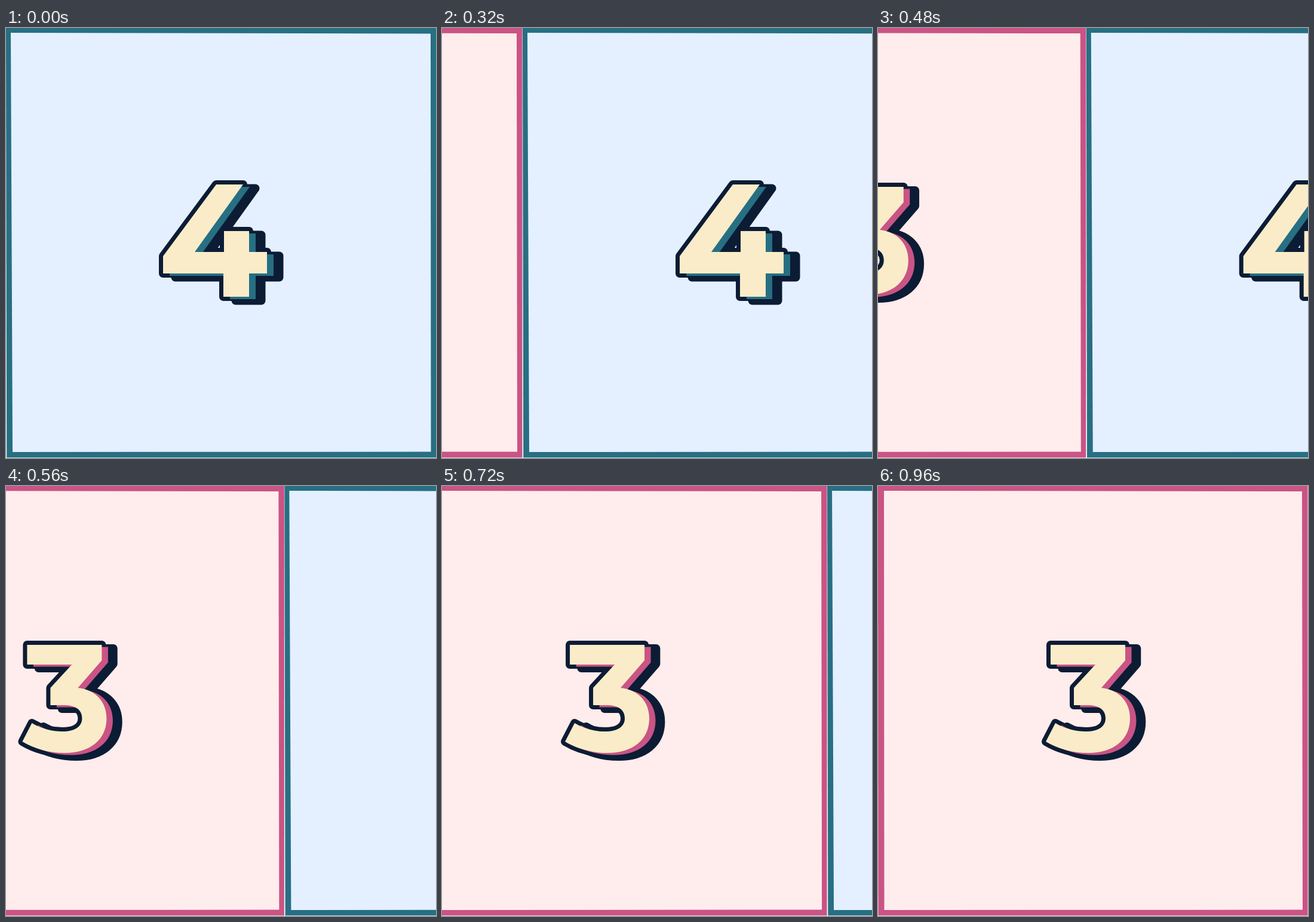
Write an HTML page that moves like this. It is 720x720 px and loops after 1.04 s.

```html
<!DOCTYPE html>
<html lang="en">
<head>
<meta charset="utf-8">
<title>Sliding numbers</title>
<style>
  html, body { margin: 0; width: 100%; height: 100%; overflow: hidden; background: #fff; }
  svg { display: block; width: 100vw; height: 100vh; }
  .ink { fill: #0c1c35; stroke: #0c1c35; stroke-width: 14; stroke-linejoin: round; }
  .face { fill: #faecc8; }
</style>
</head>
<body>
<svg viewBox="0 0 720 720">
  <defs>
    <path id="four" d="M352 262H397L316 375H365V340H407V375H437V411H407V450H364V411H263V382Z"/>
    <path id="three" d="M289 266H414V292L374 338C404 341 422 362 422 389C422 425 394 447 352 447
      C326 447 301 440 281 428L297 397C314 407 332 411 348 411C369 411 381 403 381 389
      C381 375 371 367 350 367H328V338L364 299H289Z"/>
  </defs>

  <g id="pink">
    <path fill="#c95485" d="M0 0H719.5V719.2H0.5Z"/>
    <path fill="#ffecec" d="M10 8L710 9L711 709.5L10.5 710Z"/>
    <use href="#three" class="ink"/>
    <use href="#three" class="ink" x="19.3" y="6"/>
    <use href="#three" fill="#c95485" x="10.5" y="3.5"/>
    <use href="#three" class="face"/>
  </g>

  <g id="blue">
    <path fill="#276f83" d="M0 0H720V719.2H1.2Z"/>
    <path fill="#e4f0ff" d="M8 8L711 9.5L711.5 709.5L11 710Z"/>
    <use href="#four" class="ink"/>
    <use href="#four" class="ink" x="20.5" y="6.5"/>
    <use href="#four" fill="#276f83" x="11" y="4"/>
    <use href="#four" class="face"/>
  </g>
</svg>
<script>
  const LOOP = 1040, STEP = 40, START = 51, LENGTH = 873, SIZE = 720, HANDLE = 0.45;
  const pink = document.getElementById('pink');
  const blue = document.getElementById('blue');

  // Symmetric cubic-bezier(HANDLE, 0, 1 - HANDLE, 1), solved by bisection.
  function ease(x) {
    if (x <= 0) return 0;
    if (x >= 1) return 1;
    let low = 0, high = 1, s = 0.5;
    for (let i = 0; i < 30; i++) {
      s = (low + high) / 2;
      const r = 1 - s;
      const px = 3 * HANDLE * s * r * r + 3 * (1 - HANDLE) * s * s * r + s ** 3;
      if (px < x) low = s; else high = s;
    }
    return s * s * (3 - 2 * s);
  }

  function moveTo(panel, x) {
    panel.setAttribute('transform', `translate(${x.toFixed(2)} 0)`);
  }

  function draw(time) {
    const t = Math.floor((time % LOOP) / STEP) * STEP;
    const x = SIZE * ease((t - START) / LENGTH);
    moveTo(pink, x - SIZE);
    moveTo(blue, x);
  }

  const begin = performance.now();
  function tick() {
    draw(performance.now() - begin);
    requestAnimationFrame(tick);
  }
  draw(0);
  requestAnimationFrame(tick);
</script>
</body>
</html>
```
